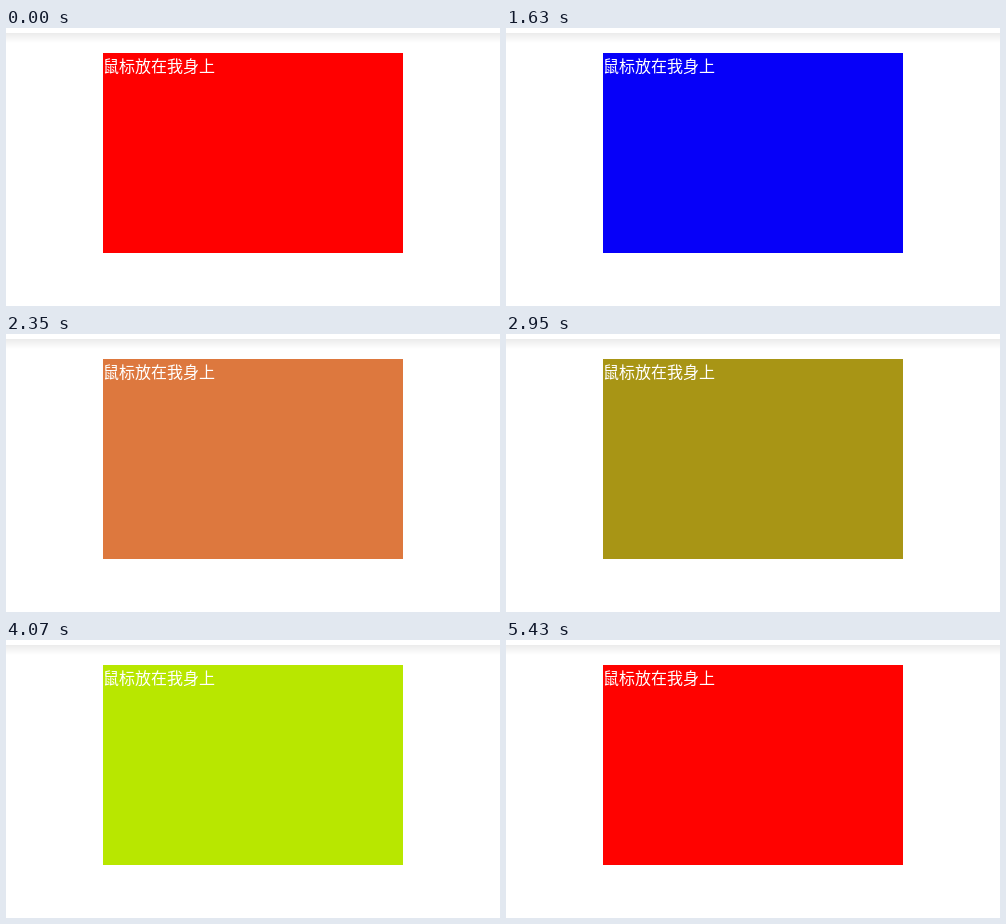
An HTML page that plays this animation: 494x278 px, repeating every 7890 ms.

```html
<!DOCTYPE html>
<html lang="zh-CN">
<head>
<meta charset="utf-8">
<title>鼠标放在我身上</title>
<style>
  html, body {
    margin: 0;
    width: 100%;
    height: 100%;
    overflow: hidden;
    background: #fff;
  }
  .shade {
    position: absolute;
    top: 5px;
    left: 0;
    width: 100%;
    height: 10px;
    background: linear-gradient(#ebebeb, #fff);
  }
  .box {
    position: absolute;
    left: 97px;
    top: 25px;
    width: 300px;
    height: 200px;
    background: red;
    color: #fff;
    font: 16px/24px "Noto Sans CJK SC", "Noto Sans CJK", sans-serif;
    white-space: nowrap;
  }
</style>
</head>
<body>
<div class="shade"></div>
<div class="box">鼠标放在我身上</div>
<script>
  const LOOP = 7890;
  const START = 890;
  const STEP = 928;
  const colors = ["#f00", "#00f", "#ff8a20", "#0a0", "#ff0", "#f00"];

  // Red rests before and after the run of colours.
  const run = colors.map((backgroundColor, i) => ({
    backgroundColor,
    offset: (START + i * STEP) / LOOP,
    easing: "ease"
  }));
  const rest = offset => ({ backgroundColor: colors[0], offset });

  document.querySelector(".box").animate(
    [rest(0), ...run, rest(1)],
    { duration: LOOP, iterations: Infinity }
  );
</script>
</body>
</html>
```
